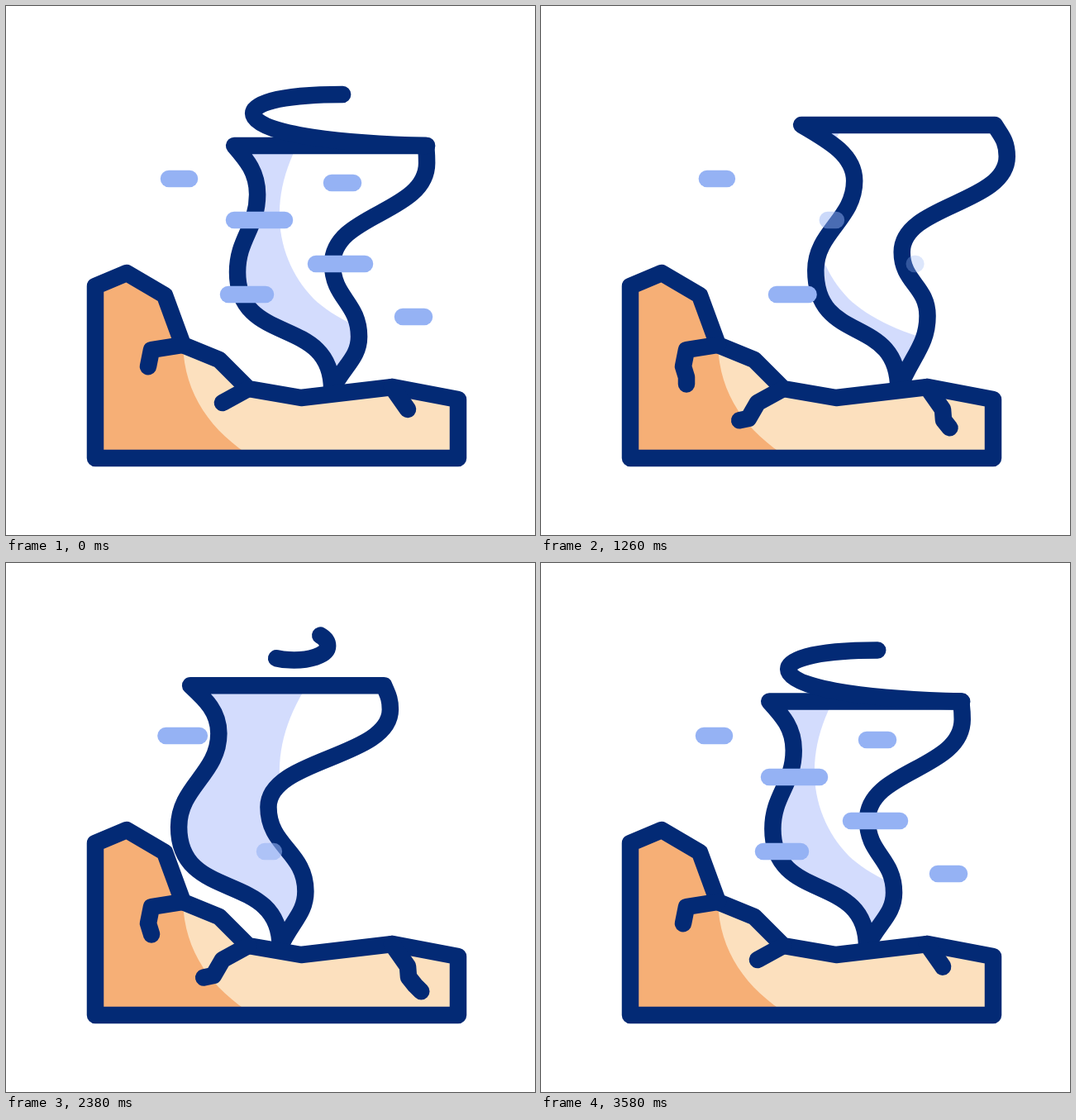
An HTML page with a canvas for the animation above (3600 ms loop, 640 by 640 pixels).

```html
<!DOCTYPE html>
<html>
<head>
<meta charset="utf-8">
<style>
  html, body { margin: 0; width: 100%; height: 100%; overflow: hidden; background: #fff; }
  canvas { display: block; width: 640px; height: 640px; }
</style>
</head>
<body>
<canvas id="stage" width="640" height="640"></canvas>
<script>
const ctx = document.getElementById('stage').getContext('2d');
const LOOP = 3600, STEP = 450;
const NAVY = '#032a75', BLUE = '#95b2f4', PALE = '#d3dcfd', ORANGE = '#f6af76', SAND = '#fce0be';

const mix = (a, b, k) => a + (b - a) * k;

// keys: flat list of time, value pairs
function track(keys, t) {
  for (let i = 2; i < keys.length; i += 2) {
    if (t <= keys[i]) {
      const k = (t - keys[i - 2]) / (keys[i] - keys[i - 2]);
      return mix(keys[i - 1], keys[i + 1], Math.max(0, k));
    }
  }
  return keys[keys.length - 1];
}

// Funnel poses, x relative to the foot:
// top y, top left x, top right x, then two left bends and three right bends (upper to lower)
const REST   = [169, -118, 114, -90, 228, -114, 322, 115, 190,   1, 312, 33, 400];
const TALL   = [132,  -98, 132, -76, 178, -140, 313, 135, 159, -29, 283, 27, 398];
const SQUASH = [188, -134, 110, -70, 275,  -80, 335, 129, 222,  22, 325, 40, 395];
const LEAN   = [133, -113, 118, -49, 196, -105, 316, 132, 172,   0, 291, 34, 370];
const LOW    = [197, -134, 111, -85, 271,  -98, 341, 129, 231,  -1, 345, 43, 415];
const POSES = [REST, TALL, SQUASH, LEAN, LOW, TALL, SQUASH, LEAN, REST];
const FOOT_X = [0, 394, 900, 473, 2250, 321, 3150, 394, LOOP, 394];
const FOOT_Y = 464;

const GROUND = new Path2D('M108 547V339L146 323L192 350L214 410L258 428L293 463L357 474L468 461L547 476V547Z');
const SLOPE = new Path2D('M108 547V339L146 323L192 350L214 410C216 470 248 515 300 547Z');
const LIT = new Path2D('M385 120C310 210 320 300 372 354C395 376 440 400 500 410H640V120Z');

// path, resting length, extra length over time
const CRACKS = [
  ['M214 410L176 416L172 436L176 449V463', 59,
    [0, 0, 600, 12, 1260, 22, 1650, 27, 1900, 26, 2380, 14, 2700, 9, 3240, 0]],
  ['M293 463L262 480L251 499L237 502', 35.4,
    [0, 0, 600, 21, 1260, 33, 1900, 36, 2380, 34, 2700, 22, 3300, 0]],
  ['M467 461L486 488L487 501L495 511L504 520', 33,
    [0, 0, 600, 13, 1260, 25, 1900, 34, 2300, 39, 2700, 25, 3260, 12, LOOP, 0]]
].map(([d, base, grow]) => ({ path: new Path2D(d), base, grow }));

// y, resting span, exit time, second pass span and start, return time
const GUSTS = [
  [209, 197, 222, 1217, 177, 247, 2115, 2900],
  [214, 394, 420,  558, 376, 456, 1434, 2950],
  [259, 276, 337, 1021, 265, 350, 1836, 2800],
  [312, 375, 434, 1000, 350, 445, 1518, 2684],
  [349, 269, 314, 1168, 250, 324, 1890, 2780],
  [376, 480, 506,  478, 470, 515, 1320, 2472]
];
const PASS = 530;
const tail = u => u ** 2.1;
const head = u => 1 - (1 - u) ** 2.4;

function strokeTrim(path, from, to) {
  if (to <= from) return;
  ctx.setLineDash([to - from, 2000]);
  ctx.lineDashOffset = -from;
  ctx.stroke(path);
  ctx.setLineDash([]);
}

function bend(path, x0, y0, x1, y1, f) {
  const h = (y1 - y0) * f;
  path.bezierCurveTo(x0, y0 + h, x1, y1 - h, x1, y1);
}

function funnelPath([top, tl, tr, ax, ay, bx, by, cx, cy, dx, dy, ex, ey]) {
  const p = new Path2D();
  p.moveTo(0, FOOT_Y);
  bend(p, 0, FOOT_Y, bx, by, 0.64);
  bend(p, bx, by, ax, ay, 0.43);
  p.bezierCurveTo(ax, mix(ay, top, 0.45), mix(tl, ax, 0.55), mix(top, ay, 0.3), tl, top);
  p.lineTo(tr, top);
  p.bezierCurveTo(mix(tr, cx, 0.5), mix(top, cy, 0.33), cx, mix(cy, top, 0.5), cx, cy);
  bend(p, cx, cy, dx, dy, 0.5);
  bend(p, dx, dy, ex, ey, 0.47);
  p.bezierCurveTo(ex, mix(ey, FOOT_Y, 0.4), ex * 0.45, mix(FOOT_Y, ey, 0.45), 0, FOOT_Y);
  return p;
}

const WIDE_SWIRL = new Path2D('M233 0C144 -2 23 -12 23 -39C23 -54 69 -62 131 -62');
const ROUND_SWIRL = new Path2D('M125 0C85 0 49 -17 49 -39C49 -58 77 -69 113 -69' +
  'C145 -69 166 -61 166 -48C166 -36 142 -30 120 -31Q112 -31 104 -33');

function drawFunnel(t) {
  const i = Math.floor(t / STEP), k = t / STEP - i;
  const pose = POSES[i].map((v, n) => mix(v, POSES[i + 1][n], k));
  const path = funnelPath(pose), x = track(FOOT_X, t);

  ctx.save();
  ctx.translate(x, 0);
  ctx.fillStyle = PALE;
  ctx.fill(path);
  ctx.restore();
  ctx.fillStyle = '#fff';
  ctx.fill(LIT);

  ctx.save();
  ctx.translate(x, 0);
  ctx.lineCap = 'butt';
  ctx.stroke(path);
  ctx.lineCap = 'round';
  ctx.translate(pose[1], pose[0]);
  if (t < 1100) strokeTrim(WIDE_SWIRL, track([0, 0, 640, 0, 1050, 360], t), 360);
  else if (t > 2750) strokeTrim(WIDE_SWIRL, 0, track([2750, 0, 3320, 360], t));
  else strokeTrim(ROUND_SWIRL, track([2050, 0, 2380, 214, 2540, 310], t),
    track([1500, 0, 1900, 245, 2050, 310], t));
  ctx.restore();
}

function drawGround(t) {
  ctx.fillStyle = SAND;
  ctx.fill(GROUND);
  ctx.fillStyle = ORANGE;
  ctx.fill(SLOPE);
  ctx.stroke(GROUND);
  for (const { path, base, grow } of CRACKS) strokeTrim(path, 0, base + track(grow, t));
}

function drawGust([y, restA, restB, exit, passA, passB, second, back], t) {
  let a = passA, b = passB, u = (t - second) / PASS;
  const leaving = t < exit + PASS / 2;
  if (leaving || t >= back) {
    const length = (restB - restA) / (head(0.5) - tail(0.5));
    a = restA - length * tail(0.5);
    b = a + length;
    u = leaving ? 0.5 + Math.max(0, t - exit) / PASS : Math.min(0.5, (t - back) / PASS);
  }
  if (u < 0 || u > 1) return;
  ctx.globalAlpha = Math.min(1, 0.3 + 4 * Math.min(u, 1 - u));
  ctx.beginPath();
  ctx.moveTo(mix(a, b, tail(u)), y);
  ctx.lineTo(mix(a, b, head(u)) + 0.01, y);
  ctx.stroke();
  ctx.globalAlpha = 1;
}

function draw(now) {
  const t = now % LOOP;
  ctx.clearRect(0, 0, 640, 640);
  ctx.lineWidth = 20.5;
  ctx.lineCap = ctx.lineJoin = 'round';
  ctx.strokeStyle = NAVY;
  drawFunnel(t);
  drawGround(t);
  ctx.strokeStyle = BLUE;
  for (const gust of GUSTS) drawGust(gust, t);
}

const start = performance.now();
function tick() {
  draw(performance.now() - start);
  requestAnimationFrame(tick);
}
tick();
</script>
</body>
</html>
```
